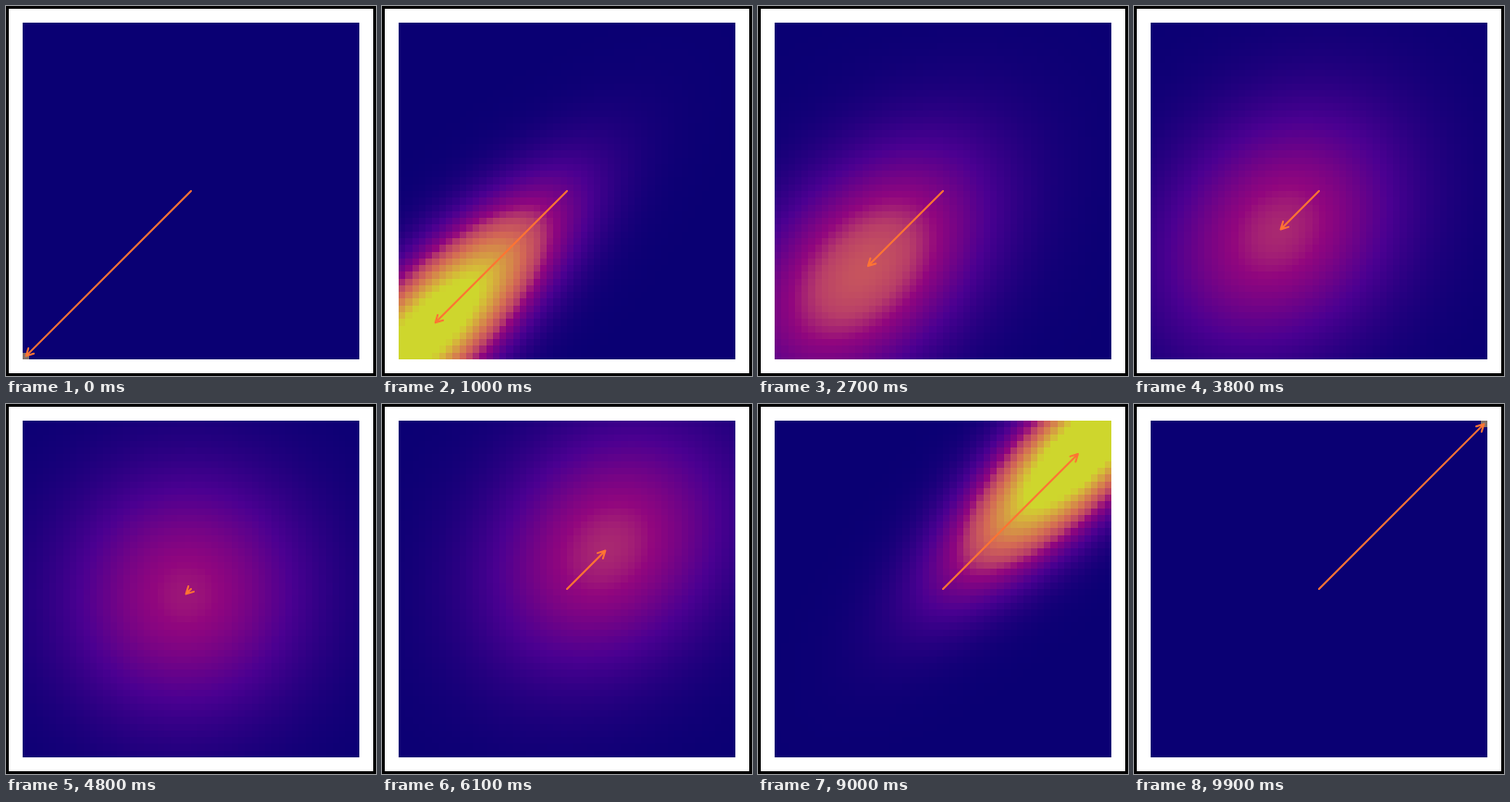
Recreate the animation shown at these times as an HTML page with a canvas. Size 400x400 px, loop 10 s.

```html
<!DOCTYPE html>
<html lang="en">
<head>
<meta charset="utf-8">
<title>Correlated density</title>
<style>
  html, body { margin: 0; width: 100%; height: 100%; overflow: hidden; background: #fff; }
  canvas { display: block; width: 400px; height: 400px; }
</style>
</head>
<body>
<canvas id="stage" width="400" height="400"></canvas>
<script>
const ctx = document.getElementById('stage').getContext('2d');

const STEPS = 100, STEP_MS = 100;
const CELLS = 50, LEFT = 18, SIZE = 364, MID = 200;
const CELL = SIZE / CELLS;
const REACH = (SIZE - CELL) / 2;   // centre to the middle of a corner cell
const SPREAD = 92;                 // standard deviation of x and y, in px
const GAIN = 0.43 * 2 * Math.PI * SPREAD * SPREAD * 0.9 / (CELL * CELL);

// level, r, g, b
const RAMP = [
  [0, 10, 0, 115],
  [0.2, 75, 0, 145],
  [0.4, 145, 6, 126],
  [0.5, 184, 62, 104],
  [0.65, 212, 106, 84],
  [0.9, 214, 182, 58],
  [1, 206, 214, 45]
];

function rampColor(v) {
  v = Math.min(1, v);
  let i = 1;
  while (i < RAMP.length - 1 && v > RAMP[i][0]) i++;
  const a = RAMP[i - 1], b = RAMP[i];
  const k = (v - a[0]) / (b[0] - a[0]);
  const c = [1, 2, 3].map(n => Math.round(a[n] + (b[n] - a[n]) * k));
  return `rgb(${c})`;
}

const edge = i => Math.round(LEFT + i * CELL);
const middle = i => LEFT + (i + 0.5) * CELL;

function fillCell(col, row, color) {
  const x = edge(col), y = edge(row);
  ctx.fillStyle = color;
  ctx.fillRect(x, y, edge(col + 1) - x, edge(row + 1) - y);
}

// Bivariate normal, normalised over the square; correlation follows |mean|.
function drawDensity(m) {
  const rho = Math.abs(m);
  if (rho > 0.999) {
    ctx.fillStyle = rampColor(0);
    ctx.fillRect(LEFT, LEFT, SIZE, SIZE);
    const last = CELLS - 1;
    fillCell(m > 0 ? last : 0, m > 0 ? 0 : last, 'rgb(130,114,106)');
    return;
  }
  const shift = m * REACH * 1.05;
  const q = 2 * (1 - rho * rho);
  const values = [];
  let sum = 0;
  for (let row = 0; row < CELLS; row++) {
    const v = (MID - middle(row) - shift) / SPREAD;
    for (let col = 0; col < CELLS; col++) {
      const u = (middle(col) - MID - shift) / SPREAD;
      const p = Math.exp(-(u * u - 2 * rho * u * v + v * v) / q);
      values.push(p);
      sum += p;
    }
  }
  values.forEach((p, i) =>
    fillCell(i % CELLS, Math.floor(i / CELLS), rampColor(p / sum * GAIN)));
}

function drawArrow(m) {
  const x = MID + m * REACH, y = MID - m * REACH;
  const back = Math.atan2(MID - y, MID - x);
  const arm = side => [x + 8.8 * Math.cos(back + side * 0.49),
                       y + 8.8 * Math.sin(back + side * 0.49)];
  ctx.strokeStyle = '#ff7433';
  ctx.lineWidth = 2;
  ctx.lineCap = ctx.lineJoin = 'round';
  ctx.beginPath();
  ctx.moveTo(MID, MID);
  ctx.lineTo(x, y);
  ctx.moveTo(...arm(1));
  ctx.lineTo(x, y);
  ctx.lineTo(...arm(-1));
  ctx.stroke();
}

function draw(step) {
  const m = 2 * step / (STEPS - 1) - 1;
  ctx.fillStyle = '#000';
  ctx.fillRect(0, 0, 400, 400);
  ctx.fillStyle = '#fff';
  ctx.fillRect(3, 3, 394, 394);
  drawDensity(m);
  drawArrow(m);
}

const start = performance.now();
let shown = -1;

function tick() {
  const elapsed = performance.now() - start;
  const step = Math.floor(elapsed / STEP_MS) % STEPS;
  if (step !== shown) draw(shown = step);
  requestAnimationFrame(tick);
}
tick();
</script>
</body>
</html>
```
